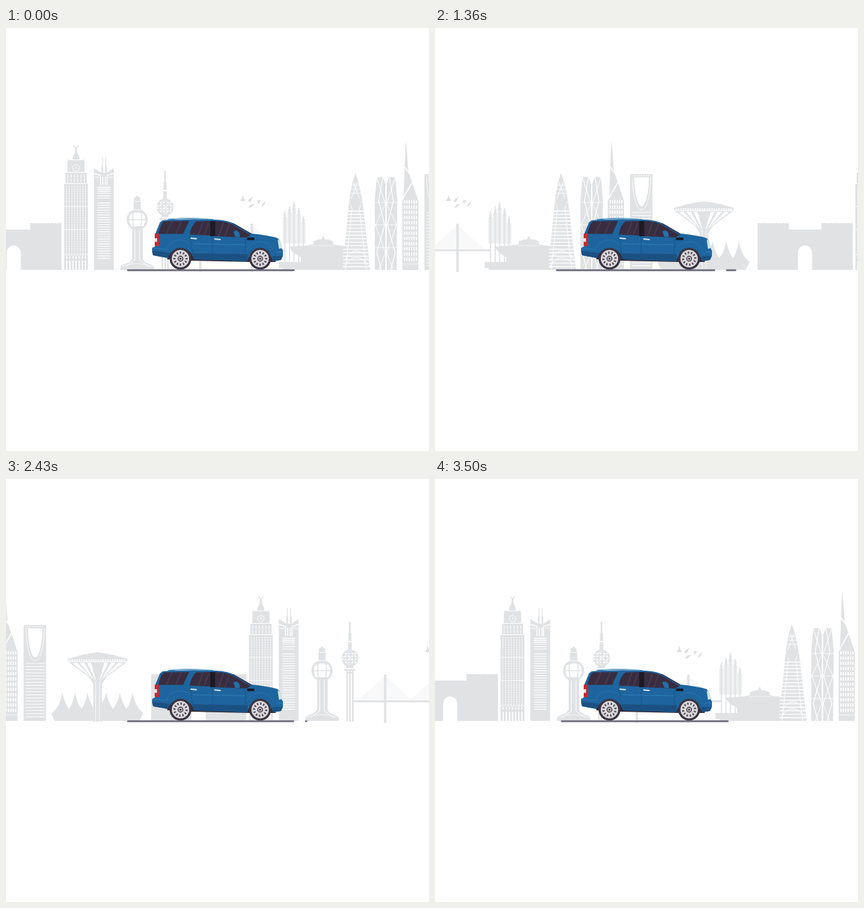
An HTML page that plays this animation: 640 by 640 pixels, repeating every 3.57 s.

```html
<!DOCTYPE html>
<html lang="en">
<head>
<meta charset="utf-8">
<title>City drive</title>
<style>
html, body { margin: 0; width: 100%; height: 100%; overflow: hidden; background: #fff; }
svg { display: block; width: 100%; height: 100%; }
</style>
</head>
<body>
<svg id="stage" viewBox="0 0 640 640"></svg>
<script>
const GREY = '#e0e2e4', SPAN = 886, SPEED = 9.94, LOOP = 3570, STEP = 71.4;

const fill = (d, c = GREY) => `<path d="${d}" fill="${c}"/>`;
const line = (d, w = 1, c = '#fff', more = '') =>
  `<path d="${d}" fill="none" stroke="${c}" stroke-width="${w}" ${more}/>`;
const rect = (x, y, w, h, c = GREY, r = 0) =>
  `<rect x="${x}" y="${y}" width="${w}" height="${h}" rx="${r}" fill="${c}"/>`;
const disc = (x, y, r, c = GREY) => `<circle cx="${x}" cy="${y}" r="${r}" fill="${c}"/>`;
const dash = s => `stroke-dasharray="${s}"`;
const each = (n, f) => Array.from({ length: n }, (_, i) => f(i)).join('');
const rows = (x, w, y, n, gap) => each(n, i => `M${x} ${y + i * gap}h${w}`);
const cols = (x, n, gap, y, h) => each(n, i => `M${x + i * gap} ${y}v${h}`);

const gate = () =>
  fill('M-60 366V296H-12.5V305H36.500V296H84V366H22.500V341C22.500 325 1 325 1 341V366Z') +
  line('M-59 295.500H-12.500M36.500 295.500H84', 1.2, GREY, dash('3 1.5'));

const clockTower = () =>
  line('M102.5 177Q103 181 106 181Q109 181 109.5 177', 1.3, GREY) +
  fill('M105 180h2l1 9 3 6v5h5l1-2 2 4v17h3v16h2v131H88V236h2V219h3V202l2-4 1 2h5v-5l3-6Z') +
  line('M101 199.5H111M93 218.5H119M89 235.5H123', 1) +
  '<circle cx="106" cy="211.5" r="5" fill="none" stroke="#fff"/>' +
  line('M106 208.5V212H108', .8) +
  line(cols(93.5, 6, 5, 222, 12), 1, '#fff', dash('5 1.5')) +
  line(cols(91.5, 8, 4.15, 239, 104), 1, '#fff', dash('2.2 1.4')) +
  line('M88 270H124M88 305H124M88 343H124', .8) +
  line(cols(92, 7, 4.7, 352, 14), 1.8) + line(cols(92, 7, 4.7, 345, 4), 1.4);

const twinTower = () =>
  line('M146 195V222M151 195V222', 1.2, GREY) +
  fill('M144.5 219V208H147V219H150V208H152.5V219L163 212V366H133V212Z') +
  line('M133 220L143 223V238M163 220L153 223V238M146.5 225V238M150.5 225V238', 1.4) +
  line('M134 226H141M155 226H162', 1) +
  line(rows(138.5, 19, 241, 3, 3), 1.3) +
  line(rows(138.5, 19, 250, 28, 3.65), 1.1) +
  line('M138 261H158M138 270H158', 2.2, GREY);

const globeTower = () =>
  fill('M196 256L198.500 253L201 256H203V262H204V275H193V262H194V256Z') +
  disc(198.5, 290, 16) +
  fill('M188 282Q198.500 276 209 282Q213 290 208 300H189Q184 290 188 282Z', '#fff') +
  line('M193 278Q190 290 194 303M204 278Q207 290 203 303M185 290H212', 1.5, GREY) +
  rect(191, 302, 16, 52) +
  fill('M190 350H207L210 354L222 359L224 362V366H173V362L175 359L187 354Z') +
  line('M194 262.5H203M193 275H204', .8) +
  line('M195 305V351L181 361M202 305V351L216 361', 1) + line('M175 361Q198 352 222 361', .7);

const ballTower = () =>
  rect(239.3, 216, 2.6, 20) + rect(238.3, 233, 4.6, 12) + rect(237.8, 247, 5.6, 12) +
  disc(240.7, 271, 13) +
  line(rows(228, 26, 264, 4, 4.5), 2, '#fff', dash('2.5 2.5')) +
  line('M230 271L240 260M233 279L250 261M240 283L253 270M251 271L241 260M248 279L231 261M241 283L228 270', .6) +
  rect(235, 282, 11, 4) + rect(232, 287.5, 17, 2.6) +
  line('M236.5 290V367M240.7 290V367M245 290V367', 2.5, GREY) + rect(235, 292, 11, 2);

const bridge = () =>
  [294, 372].map(x =>
    fill(`M${x} 298L${x - 40} 334H${x + 40}Z`, '#f9f9fa') +
    line(each(6, i => `M${x - 38 + i * 6} 334L${x} 299L${x + 38 - i * 6} 334`), .4, '#f3f4f5') +
    rect(x - 1.8, 296, 3.6, 73)).join('') +
  line('M246 336.3H422', 3, GREY);

const birds = () =>
  fill('M354 261L357 258L358 252L360 258L363 261L358 262Z' +
       'M365 264L368 259L374 255L371 261L369 264L367 262Z' +
       'M367 271L371 267L377 266L373 269L370 272Z' +
       'M380 261L382 260L386 261L383 264L382 267L381 264Z' +
       'M386 271L388 266L393 262L391 267L388 270Z', '#dcdee0');

const trees = () =>
  [[422, 277], [429, 270], [435.7, 263], [443, 272], [450, 285]].map(([x, y]) =>
    line(`M${x} ${y + 10}V326`, 6.5, '#e6e8e9', dash('1.4 .6')) +
    line(`M${x} ${y + 4}v8`, 4, GREY, dash('1.4 .6')) +
    line(`M${x} ${y}V356`, 1.7, GREY)).join('') +
  rect(413, 354, 34, 9) + rect(419, 361, 40, 5);

const oasis = () =>
  fill('M428 331L456 329L465 327V323L472 320H477L480 314L483 320H488L495 323V327L504 329L533 331L530 336L514 347V350H531V354H526V366H446V347L434 339Z') +
  line('M462 329H498', .5) + line('M515 350H532', .7);

const coneTower = () =>
  fill('M528.5 220C534 232 538 252 541 275L551 366H509L518 275C520 252 524 232 528.5 220Z') +
  line('M526 234L535 259M532 234L522 259M520 262L524 276M538 262L534 276', 1) +
  line(rows(519, 20, 238, 3, 6), .8) +
  disc(529, 264, 8.5) +
  line('M517 277H541M516 282H542', 1.4) +
  line(rows(510, 41, 287, 15, 5.3), 1.4) +
  line('M523 277L514 366M535 277L545 366', 1) +
  line('M512 352Q530 322 549 352M511 361Q530 334 550 361', 1);

const bracedTowers = () =>
  fill('M561 226L570 225L575 238L580 225L589 226L592 260L591 366H558V260Z') +
  line('M575 237V366', 2) +
  line('M570 225L564 262L573 298L561 340L568 366M580 225L586 262L577 298L589 340L582 366', 1.2) +
  line('M561 226L574 266L559 298L574 340L564 366M589 226L576 266L591 298L576 340L586 366', 1) +
  line('M558 264H592M558 298H592M558 332H592', .7);

const needle = () =>
  fill('M604.5 171L606.5 185L608.5 216L614 232L624 262V366H599.5V262L601.5 255L603 212Z') +
  line('M602 209L615 226M600 259L615 233', 1.6) +
  line(rows(602, 20, 263, 12, 7.9), 5, '#fff', dash('1.9 1.7')) +
  line('M600 357H624', .7);

const archTower = () =>
  fill('M634 221H667V366H633V224Z') +
  fill('M639.5 226H661.5C661.5 250 656 270 650.5 270C645 270 639.5 250 639.5 226Z', '#fff') +
  line('M636.5 226C637 254 643 275 650.5 275C658 275 664 254 664.5 226', .8) +
  line('M638 223.5H664', 1.4, '#fff', dash('2 1.8')) +
  line(rows(636, 29, 279, 18, 4.75), 1.1);

const tents = () => {
  const peaks = [691.6, 710.6, 729.6, 758, 778.6, 797.6];
  return fill('M680 366L675 355L682 348' +
    peaks.map(x => `Q${x - 3} 340 ${x} 323Q${x + 3} 338 ${x + 10} 348`).join('') +
    'L814 354L808 366Z');
};

const waterTower = () =>
  fill('M700 272L722 266L745 262L768 266L790 272V276H700Z') +
  line('M702 274.3H788', 2.4, '#fff', dash('2 1.6')) +
  fill('M701 277H789L759 299L751.500 310V367H738.500V310L731 299Z') +
  fill('M707 279L714 278L737 302ZM718 278H725L740 305ZM729 278H735L743 307ZM783 279L776 278L753 302ZM772 278H765L750 305ZM761 278H755L747 307Z', '#fff') +
  line('M742 306V367M748 306V367', .8);

const city = [gate, clockTower, twinTower, globeTower, ballTower, bridge, birds, trees, oasis,
  coneTower, bracedTowers, needle, archTower, tents, waterTower].map(f => f()).join('');

const wheel = x =>
  `<g transform="translate(${x} 349)">` +
  disc(0, 0, 16.6, '#3b3442') + disc(0, 0, 13.2, '#d9d7da') +
  '<g class="rim">' +
  each(12, i => `<ellipse cy="-9.2" rx="1.2" ry="1.9" fill="#554d5c" transform="rotate(${i * 30})"/>`) +
  '</g>' + disc(0, 0, 4.4, '#463e4d') + disc(0, 0, 3, '#c4c1c7') + disc(0, 0, 1.5, '#463e4d') + '</g>';

const car =
  fill('M229 344H408V354H370L280 352L246 347Z', '#302a39') +
  fill('M244 350A20 20 0 0 1 284 350ZM364.5 352A20 20 0 0 1 404.5 352Z', '#302a39') +
  // body
  fill('M237 291Q275 288 318 290Q337 291 347 297L371 311Q400 314 411 318Q416 322 417 333L419 337V345L416 351L404 353A20 20 0 0 0 365 353L284 350A20 20 0 0 0 245 348L223 344Q221 343 221 333L226 330V311L233 294Z', '#1e659f') +
  fill('M282.5 341L366 342L365 353L284 350ZM221 337L247 340L245 348L223 344ZM403 345H418L416 351L404 353Z', '#1b5182') +
  line('M245 290Q275 286 314 290', 1.6, '#2b7db5') +
  line('M247 288.7Q280 287 309 289', .7, '#a3cbe0') +
  line('M343 295.5L371 311.5', 1.3, '#2c2b40') +
  line('M284 326.5L362 328', 1.1, '#2f7db5') +
  line('M243 334A22 22 0 0 1 283 333M365 335A22 22 0 0 1 404 335', 1, '#2872aa') +
  line('M278 313L282 339L285 350M312 315V350M362 319V341', .7, '#174f82') +
  line('M221 333L245 335', .8, '#2f7db5') +
  // glass
  fill('M239 292.5L277 292L268 311.5H230L235 297Z', '#382d40') +
  fill('M288 292.5L310 292V314L278 312.5Q280 299 288 292.5Z', '#382d40') +
  fill('M316 292Q334 292 344 298L370 313L364 317L316 315Z', '#382d40') +
  fill('M309 292H316.5V315H309Z', '#1d1a26') +
  line('M251 293L243 311M265 293L257 311M298 293L291 313M307 294L300 313M329 294L322 315M338 297L331 315', 2, '#47394c') +
  fill('M344 308Q349 304 353 310L354 316H347Z', '#2470a9') +
  // trim and lamps
  line('M280 318L288 318.7M316 319.3L324 320', 2, '#d6e3eb', 'stroke-linecap="round"') +
  rect(364.5, 317, 11.5, 4, '#191c2b', 1.5) +
  rect(225, 311, 6.5, 19, '#c42b2f', 1) + rect(225, 318, 3.5, 5.5, '#f0e4e4', .5) +
  fill('M411 320Q416 321 418 333L413 334Z', '#cfe4dd') +
  line('M409 339H418', 1.2, '#2f7db5') +
  wheel(264) + wheel(384.5);

document.getElementById('stage').innerHTML =
  `<g id="world"><g id="city">${city}</g><use href="#city" x="${SPAN}"/></g>` +
  '<path id="road" d="M184.5 366.5H454.5" fill="none" stroke="#797988" stroke-width="2.8" stroke-linecap="round" stroke-dasharray="251 19"/>' +
  car;

const world = document.getElementById('world');
const road = document.getElementById('road');
const rims = document.querySelectorAll('.rim');

function draw() {
  const t = performance.now() % LOOP;
  // stepped at 14 fps, sampling motion laid out at 25 fps
  const k = Math.floor((t - t % 10 + 4.9) / STEP);
  const n = Math.ceil(k * 25 / 14);
  const u = n % 30 / 30;
  world.setAttribute('transform', `translate(${-n * SPEED} 0)`);
  road.setAttribute('stroke-dashoffset', 266 * u * u * (3 - 2 * u));
  rims.forEach(r => r.setAttribute('transform', `rotate(${n * 36})`));
  requestAnimationFrame(draw);
}
draw();
</script>
</body>
</html>
```
